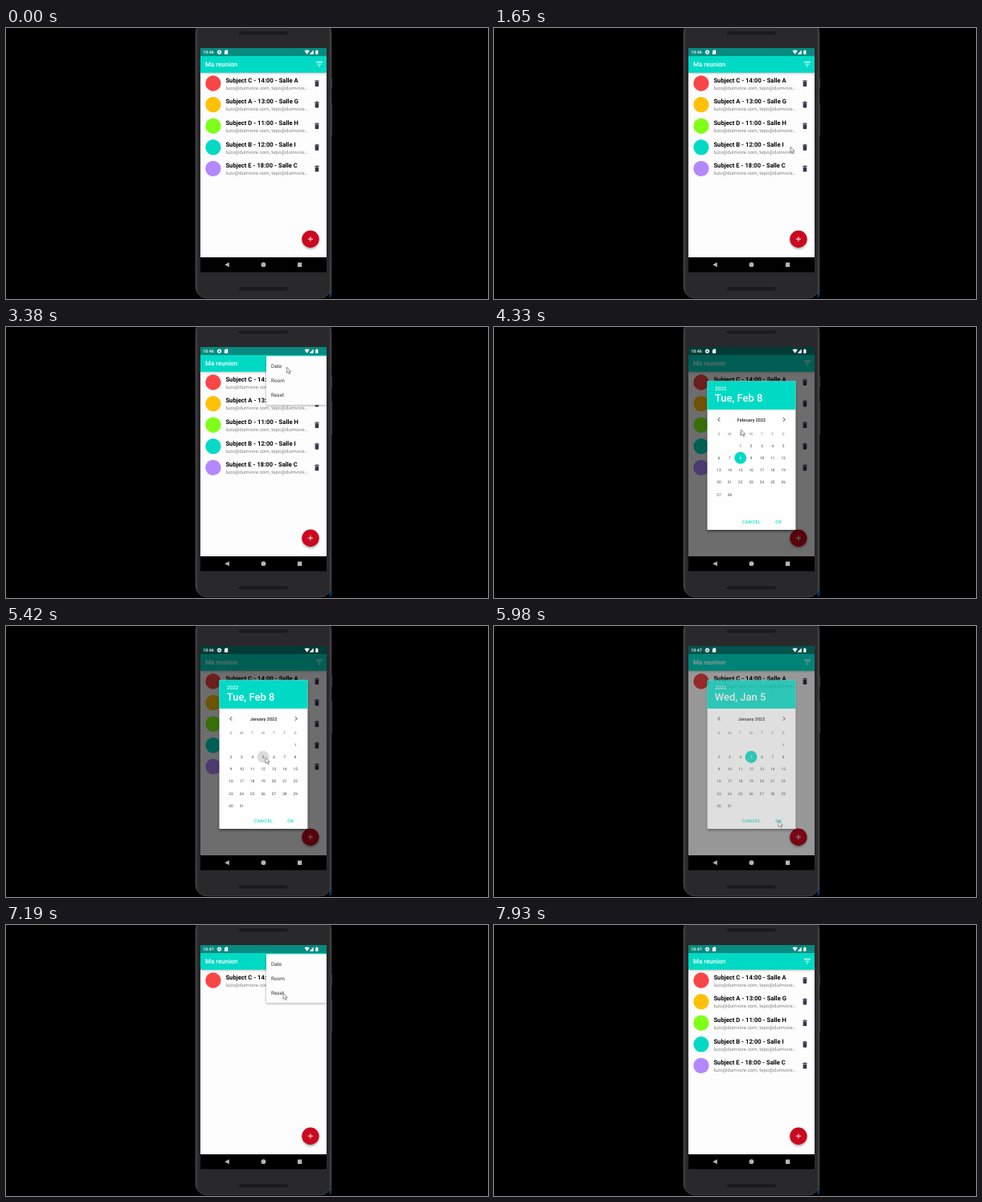
An HTML page that plays this animation: 600 by 338 pixels, repeating every 8000 ms.

```html
<!DOCTYPE html>
<html lang="fr">
<head>
<meta charset="utf-8">
<title>Ma reunion</title>
<style>
html, body { margin: 0; width: 100%; height: 100%; overflow: hidden; background: #000; }
svg { display: block; width: 100vw; height: 100vh; }
text { font-family: Roboto, "Noto Sans", sans-serif; text-rendering: geometricPrecision; }
</style>
</head>
<body>
<svg id="stage" viewBox="0 0 600 338">
  <defs>
    <linearGradient id="shell">
      <stop offset="0" stop-color="#434345"/>
      <stop offset=".02" stop-color="#29292b"/>
      <stop offset=".98" stop-color="#29292b"/>
      <stop offset="1" stop-color="#434345"/>
    </linearGradient>
    <filter id="soft" x="-30%" y="-30%" width="160%" height="160%"><feGaussianBlur stdDeviation="1.4"/></filter>
    <clipPath id="screen"><rect x="242" y="25" width="157" height="261"/></clipPath>
    <clipPath id="page"><rect x="265.5" y="103" width="110" height="132"/></clipPath>
  </defs>
</svg>
<script>
const LOOP = 8000;
const TEAL = '#00dac5';
const stage = document.getElementById('stage');

function add(parent, tag, attrs, content) {
  const node = document.createElementNS('http://www.w3.org/2000/svg', tag);
  for (const key in attrs) node.setAttribute(key, attrs[key]);
  if (content !== undefined) node.textContent = content;
  parent.append(node);
  return node;
}
const group = (parent, attrs = {}) => add(parent, 'g', attrs);
const rect = (parent, x, y, width, height, fill, rx = 0, more = {}) =>
  add(parent, 'rect', { x, y, width, height, fill, rx, ...more });
const circle = (parent, cx, cy, r, fill, more = {}) =>
  add(parent, 'circle', { cx, cy, r, fill, ...more });
const path = (parent, d, attrs) => add(parent, 'path', { d, fill: 'none', ...attrs });
const label = (parent, x, y, size, fill, content, more = {}) =>
  add(parent, 'text', { x, y, 'font-size': size, fill, ...more }, content);
const medium = { 'font-weight': 500 };
const centered = { 'text-anchor': 'middle' };

function drawPhone() {
  path(stage, 'M405 62h1.2v13h-1.2zM405 94h1.2v40h-1.2z', { fill: '#2c2c2e' });
  path(stage, 'M403 325h2.5v9l-3 3z', { fill: '#123a66' });
  rect(stage, 236, -8, 169, 344.8, 'url(#shell)', 14, { stroke: '#48484a', 'stroke-width': .8 });
  for (const y of [3.5, 322.5]) rect(stage, 289.5, y, 62, 5.5, '#1b1b1d', 2.7, { stroke: '#37373a', 'stroke-width': .5 });
  rect(stage, 242, 25, 157, 279.5, '#000');
  rect(stage, 242, 25, 157, 261, '#fdfdfd');
  path(stage, 'M277.8 292.2v6l-5.6-3z', { fill: '#b4b4b4' });
  circle(stage, 320.5, 295.2, 2.9, '#b4b4b4');
  rect(stage, 363, 292.6, 5.3, 5.3, '#b4b4b4', .5);
}

function drawBars(app) {
  rect(app, 242, 35, 157, 21.6, '#000', 0, { opacity: .25, filter: 'url(#soft)' });
  rect(app, 242, 35, 157, 20.8, TEAL);
  rect(app, 242, 25, 157, 10, '#078a80');
  label(app, 248, 48.3, 8, '#fff', 'Ma reunion', medium);
  path(app, 'M386 42.5h8M387.4 45h5.2M389 47.5h2', { stroke: '#fff', 'stroke-width': 1 });
}

function drawStatus() {
  const clock = label(stage, 245.3, 32.2, 5.3, '#fff', '', medium);
  circle(stage, 265.5, 30.2, 1.7, 'none', { stroke: '#fff', 'stroke-width': 1.5 });
  circle(stage, 265.5, 30.2, 2.6, 'none', { stroke: '#fff', 'stroke-width': .6, 'stroke-dasharray': '1 1.04' });
  path(stage, 'M273.3 27.6h2.9v5.2h-4.3v-3.7z', { fill: '#fff' });
  path(stage, 'M371.6 28.6q3.1-2 6.2 0l-3.1 4.2z', { fill: '#fff' });
  path(stage, 'M382.8 27.5v5.3h-5.1z', { fill: '#fff' });
  path(stage, 'M385.3 28.2h.9v-.7h1.4v.7h.9v4.6h-3.2z', { fill: '#fff' });
  return clock;
}

const meetings = [
  ['C - 14:00 - Salle A', '#f74645'],
  ['A - 13:00 - Salle G', '#fec107'],
  ['D - 11:00 - Salle H', '#80ff18'],
  ['B - 12:00 - Salle I', '#02dac5'],
  ['E - 18:00 - Salle C', '#b388ff'],
];

function drawMeeting(parent, [title, color], index) {
  const row = group(parent, { transform: `translate(0 ${69 + index * 26.6})` });
  circle(row, 257.9, 0, 9.7, color);
  label(row, 273.4, -1.2, 7.66, '#050505', 'Subject ' + title, { 'font-weight': 700 });
  label(row, 273.5, 7.8, 6.1, '#858585', 'luzo@dumvore.com, tepo@dumvore...');
  path(row, 'M384.3-3.4h1.4l.5-.6h1.6l.5.6h1.4v1h-5.4zM384.7-2h4.6v5q0 .9-.9.9h-2.8q-.9 0-.9-.9z', { fill: '#39394c' });
  return row;
}

function drawFab(app) {
  circle(app, 379, 264.8, 10.6, '#000', { opacity: .38, filter: 'url(#soft)' });
  circle(app, 379, 263.2, 10.7, '#ca0820');
  path(app, 'M375.9 263.2h6.2M379 260.1v6.2', { stroke: '#fff', 'stroke-width': .9 });
}

function drawMenu(app) {
  const menu = group(app);
  rect(menu, 324, 37.5, 75, 60.5, '#000', 1, { opacity: .4, filter: 'url(#soft)' });
  rect(menu, 324, 36.3, 75, 61, '#fdfdfd', .8);
  ['Date', 'Room', 'Reset'].forEach((name, i) => label(menu, 330, 50.7 + i * 18.3, 6.4, '#333', name));
  return menu;
}

const columnX = i => 280 + i * 13.37;
const rowY = i => 148 + i * 15.2;

function drawMonth(parent, name, firstColumn, days, picked) {
  const month = group(parent);
  label(month, 320.5, 117.7, 5.5, '#222', name, { ...medium, ...centered });
  [...'SMTWTFS'].forEach((day, i) => label(month, columnX(i), 134.8, 4.8, '#888', day, centered));
  const disc = circle(month, 0, 0, 7.5, TEAL);
  let pickedText;
  for (let day = 1; day <= days; day++) {
    const cell = firstColumn + day - 1;
    const x = columnX(cell % 7), y = rowY(Math.floor(cell / 7));
    const text = label(month, x, y + 1.7, 4.8, '#444', day, centered);
    if (day === picked) {
      disc.setAttribute('cx', x);
      disc.setAttribute('cy', y);
      pickedText = text;
    }
  }
  return { month, disc, pickedText };
}

function drawDialog() {
  const dialog = group(stage);
  rect(dialog, 265.5, 69, 110, 186, '#000', 1, { opacity: .45, filter: 'url(#soft)' });
  rect(dialog, 265.5, 67.5, 110, 185.6, '#fefefe', .8);
  rect(dialog, 265.5, 67.5, 110, 35.5, TEAL, .6);
  label(dialog, 275, 79.3, 6.3, '#e4fbf8', '2022', medium);
  const heading = label(dialog, 274.7, 93.2, 13, '#fff', '', medium);
  const page = group(dialog, { 'clip-path': 'url(#page)' });
  const february = drawMonth(page, 'February 2022', 2, 28, 8);
  const january = drawMonth(page, 'January 2022', 6, 31, 5);
  february.pickedText.setAttribute('fill', '#fff');
  path(dialog, 'M281.2 113.2l-2.3 2.3 2.3 2.3M359.9 113.2l2.3 2.3-2.3 2.3', { stroke: '#222', 'stroke-width': .95 });
  const button = { ...medium, 'letter-spacing': .5 };
  label(dialog, 309, 244.5, 5.4, TEAL, 'CANCEL', button);
  label(dialog, 350.2, 244.5, 5.4, TEAL, 'OK', button);
  return { dialog, heading, february, january };
}

drawPhone();
const app = group(stage, { 'clip-path': 'url(#screen)' });
drawBars(app);
const rows = meetings.map((meeting, i) => drawMeeting(app, meeting, i));
drawFab(app);
const menu = drawMenu(app);
const shade = rect(stage, 242, 25, 157, 261, '#000');
const clock = drawStatus();
const { dialog, heading, february, january } = drawDialog();
const cursor = path(stage, 'M0 0v7.4l1.7-1.5 1.3 2.8 1.3-.6-1.3-2.7h2.3z',
  { fill: '#f4f4f4', stroke: '#555', 'stroke-width': .6 });

// Pointer stops: time, x, y
const stops = [
  [870, 386, 204], [1450, 369, 148], [1750, 369, 148], [2300, 390, 44], [2620, 390, 44],
  [3120, 349.5, 50], [3840, 349.5, 50], [4330, 307.5, 128], [4600, 280, 115.5],
  [4980, 280, 115.5], [5340, 323, 164], [5520, 323, 164], [5790, 354, 243],
  [5980, 354, 243], [6400, 390, 44], [6640, 390, 44], [7050, 345, 85],
  [7300, 345, 85], [7640, 390, 60],
];

const clamp = v => Math.max(0, Math.min(1, v));
const ease = v => v * v * (3 - 2 * v);
const ramp = (t, from, to) => ease(clamp((t - from) / (to - from)));
const pulse = (t, inStart, inEnd, outStart, outEnd) => ramp(t, inStart, inEnd) - ramp(t, outStart, outEnd);
const show = (node, opacity) => {
  node.setAttribute('opacity', opacity);
  node.setAttribute('visibility', opacity > 0 ? 'visible' : 'hidden');
};
const setText = (node, value) => { if (node.textContent !== value) node.textContent = value; };

function moveCursor(t) {
  const next = stops.findIndex(stop => stop[0] > t);
  show(cursor, next > 0 ? 1 : 0);
  if (next < 1) return;
  const [t0, x0, y0] = stops[next - 1], [t1, x1, y1] = stops[next];
  const k = ramp(t, t0, t1);
  cursor.setAttribute('transform', `translate(${x0 + (x1 - x0) * k} ${y0 + (y1 - y0) * k})`);
}

function draw(t) {
  const open = pulse(t, 3850, 4020, 5930, 6070);
  show(dialog, open);
  show(shade, open * .57);
  show(menu, pulse(t, 2560, 2700, 3790, 3900) + pulse(t, 6580, 6720, 7220, 7340));

  const filtered = t >= 5930 && t < 7260;
  rows.forEach((row, i) => show(row, filtered && i ? 0 : 1));
  setText(clock, t >= 5800 || t < 0 ? '10:47' : '10:46');

  const slide = ramp(t, 4720, 5020) * 110;
  february.month.setAttribute('transform', `translate(${slide} 0)`);
  january.month.setAttribute('transform', `translate(${slide - 110} 0)`);
  const picked = t >= 5460;
  setText(heading, picked ? 'Wed, Jan 5' : 'Tue, Feb 8');
  january.disc.setAttribute('fill', picked ? TEAL : '#dcdcdc');
  january.disc.setAttribute('opacity', ramp(t, 5350, 5410));
  january.pickedText.setAttribute('fill', picked ? '#fff' : '#444');

  moveCursor(t);
}

function tick() {
  draw(performance.now() % LOOP);
  requestAnimationFrame(tick);
}
tick();
</script>
</body>
</html>
```
